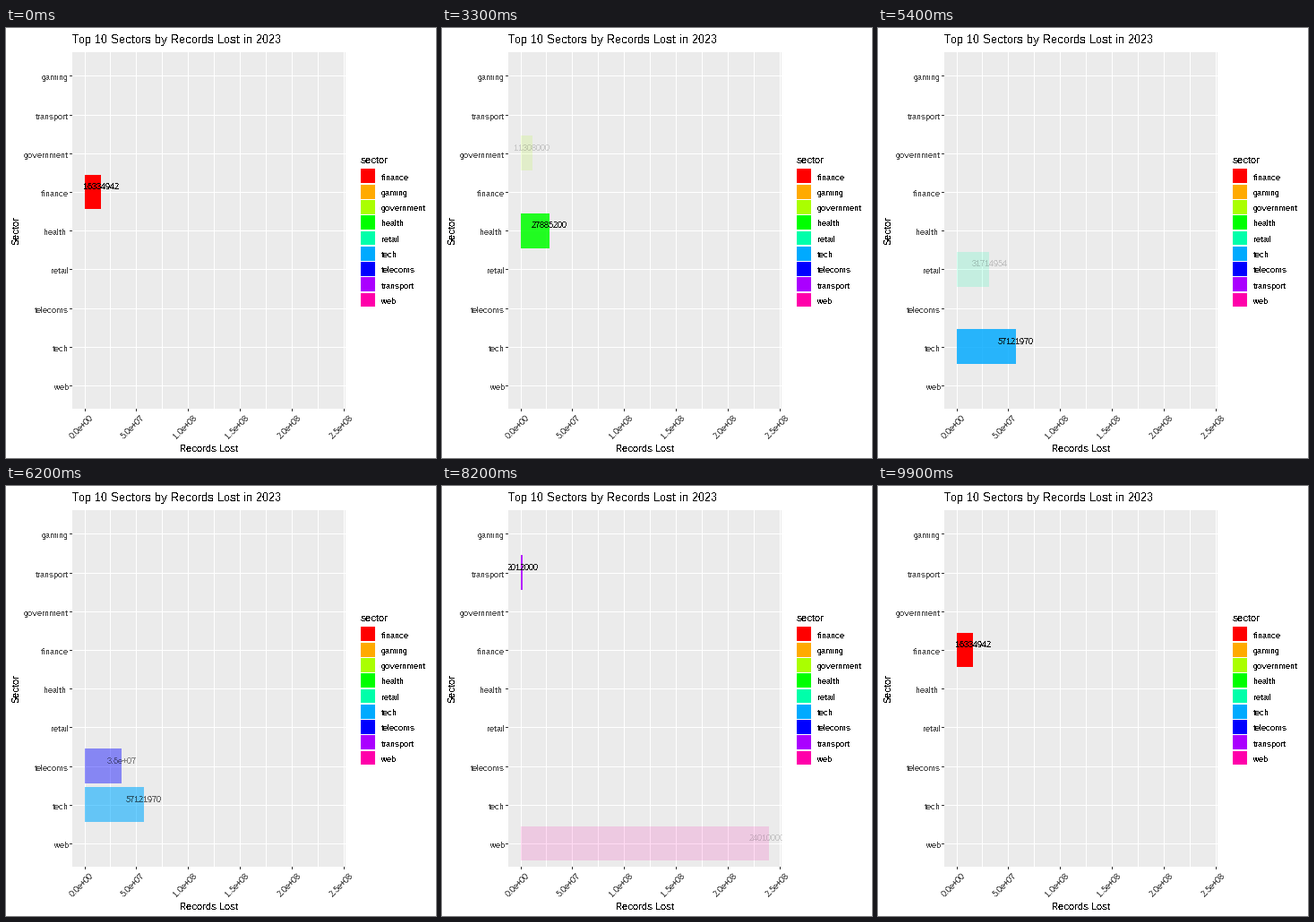
A matplotlib script that plays this animation: 480x480 px, repeating every 10 s.

```python
import colorsys

import matplotlib.pyplot as plt
from matplotlib.animation import FuncAnimation
from matplotlib.patches import Rectangle

plt.rcParams.update({
    "font.family": "Liberation Sans",
    "text.antialiased": False,
    "text.hinting": "no_autohint",
    "text.hinting_factor": 1,
    "text.kerning_factor": 6,
})

SIZE, DPI = 480, 72
FRAMES, STEP_MS = 100, 100

# sector, row on the axis, records lost
DATA = [
    ("finance", 3, 16334942),
    ("gaming", 0, 760000),
    ("government", 2, 11308000),
    ("health ", 4, 27885200),
    ("retail", 5, 31714954),
    ("tech", 7, 57121970),
    ("telecoms", 6, 36000000),
    ("transport", 1, 2012000),
    ("web", 8, 240100000),
]
# first frame and length of each cross-fade to the next sector
FADES = [(4, 8), (16, 8), (28, 7), (39, 7), (50, 6),
         (60, 7), (71, 7), (82, 7), (93, 7)]

LEFT, TOP, RIGHT, BOTTOM = 74, 27, 380, 425
X0, X_SCALE = 87.55, 28.94 / 2.5e7
Y0, ROW, HALF_BAR = 53.35, 43.2, 19.44
KEY_TOP, KEY_STEP, KEY_FILL = 157.41, 17.28, 15.84
GREY20, GREY30 = "#333333", "#4D4D4D"

fig = plt.figure(figsize=(SIZE / DPI, SIZE / DPI), dpi=DPI, facecolor="white")
ax = fig.add_axes([0, 0, 1, 1])
ax.set(xlim=(0, SIZE), ylim=(SIZE, 0))
ax.axis("off")


def box(x0, y0, x1, y1, color, z=1):
    """Fill a rectangle whose edges fall on whole pixels."""
    x0, y0, x1, y1 = (round(v) for v in (x0, y0, x1, y1))
    patch = Rectangle((x0, y0), x1 - x0, y1 - y0, fc=color, lw=0,
                      antialiased=False, zorder=z)
    return ax.add_patch(patch)


def label(x, y, s, size=9, color="black", ha="left", va="baseline", **kw):
    return ax.text(x, y, s, fontsize=size, color=color, ha=ha, va=va, **kw)


def x_pos(value):
    return X0 + value * X_SCALE


def y_pos(row):
    return Y0 + row * ROW


def number(value):
    """Fixed notation unless the scientific form is shorter."""
    fixed = str(value)
    digits = fixed.rstrip("0")
    sci = f"{value:.{len(digits) - 1}e}"
    return sci if len(sci) < len(fixed) else fixed


def draw_panel():
    box(LEFT, TOP, RIGHT - 1, BOTTOM, "#EBEBEB")
    for i in range(11):
        value = i * 2.5e7
        x = round(x_pos(value))
        box(x, TOP, x + 1, BOTTOM, "white", 1.1)
        if i % 2 == 0:
            box(x, BOTTOM, x + 1, BOTTOM + 3, GREY20)
            label(x - 3, 445.5, f"{value:.1e}", color=GREY30, ha="center",
                  va="center", rotation=45)
    for name, row, _ in DATA:
        y = round(y_pos(row))
        box(LEFT, y, RIGHT - 1, y + 1, "white", 1.1)
        box(LEFT - 3, y, LEFT, y + 1, GREY20)
        label(70, y + 5, name, color=GREY30, ha="right")


def draw_legend():
    label(396, 151, "sector", 11)
    for i, (name, color) in enumerate(zip(sorted(d[0] for d in DATA), colors)):
        y = KEY_TOP + KEY_STEP * i
        box(396, y, 412, y + KEY_FILL, color)
        label(419, round(y - 0.8) + 13, name)


colors = [colorsys.hsv_to_rgb(i / 9, 1, 1) for i in range(9)]
draw_panel()
draw_legend()
label(74, 17, "Top 10 Sectors by Records Lost in 2023", 13)
label(226.5, 473, "Records Lost", 11, ha="center")
label(11.5, 226, "Sector", 11, ha="center", va="center", rotation=90)

panel = Rectangle((LEFT, TOP), RIGHT - LEFT, BOTTOM - TOP, transform=ax.transData)
marks = []
for (name, row, value), color in zip(DATA, colors):
    y, end = y_pos(row), x_pos(value)
    start = min(round(X0), round(end) - 1)  # at least one pixel wide
    bar = box(start, y - HALF_BAR, end, y + HALF_BAR, color, 2)
    text = label(end, round(y) - 3, number(value), ha="center", clip_on=True)
    text.set_clip_path(panel)
    marks.append((bar, text))


def opacities(frame):
    alpha = [0.0] * len(DATA)
    current = 0
    for i, (start, steps) in enumerate(FADES):
        if frame < start:
            break
        after = (i + 1) % len(DATA)
        p = (frame - start + 1) / steps
        if p < 1:
            alpha[i], alpha[after] = 1 - p, p
            return alpha
        current = after
    alpha[current] = 1.0
    return alpha


def update(frame):
    artists = []
    for (bar, text), a in zip(marks, opacities(frame)):
        for artist in (bar, text):
            artist.set_alpha(a)
            artist.set_visible(a > 0)
            artists.append(artist)
    return artists


anim = FuncAnimation(fig, update, frames=FRAMES, interval=STEP_MS,
                     repeat=True, repeat_delay=0, blit=False)
plt.show()
```
